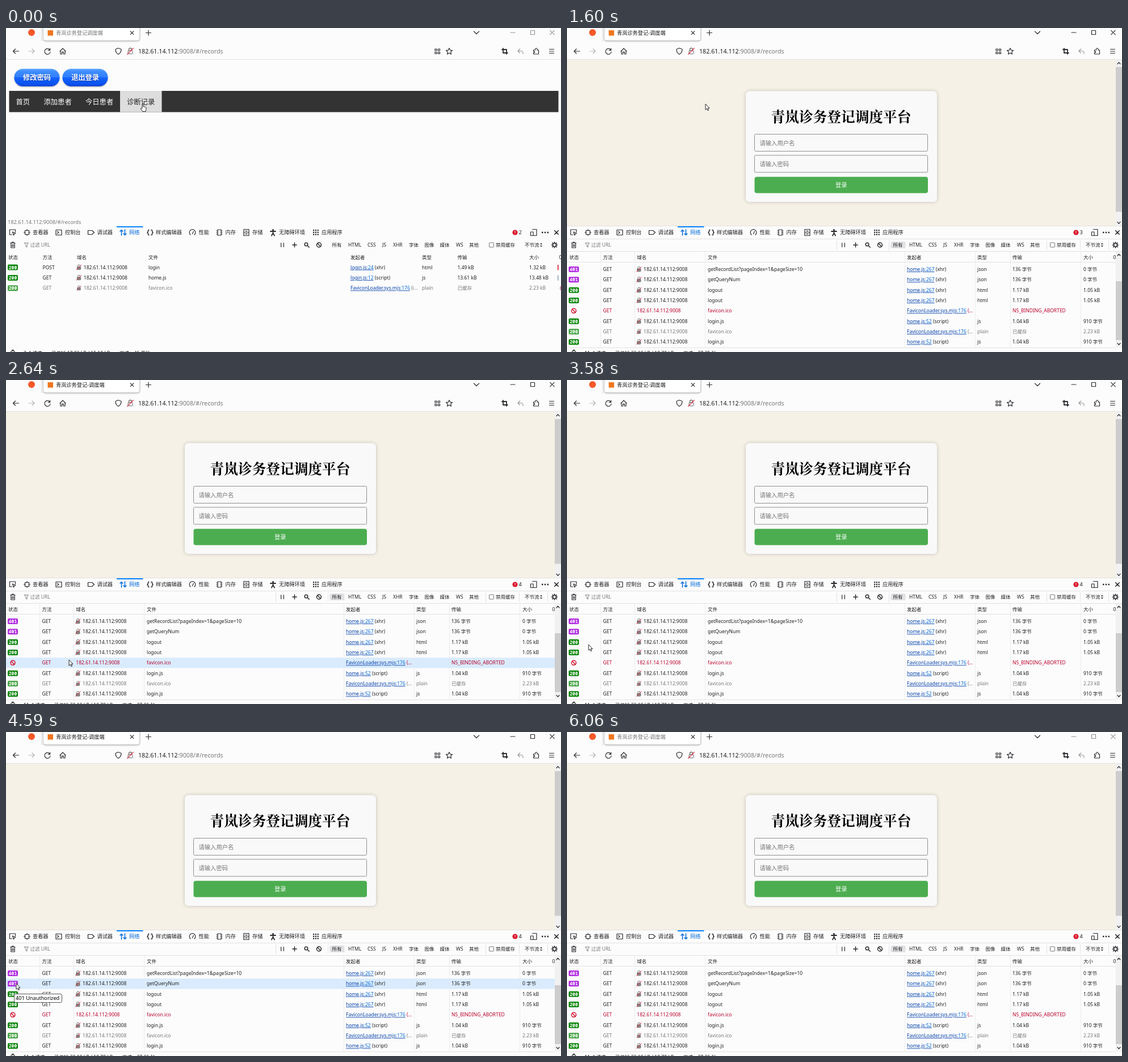
Animation of 978x572 px, one loop 6.08 s. Source, as an HTML page:

```html
<!DOCTYPE html>
<html lang="zh-CN">
<head>
<meta charset="utf-8">
<title>青岚诊务登记调度端</title>
<style>
html,body{margin:0;width:100%;height:100%;overflow:hidden;background:#fcfcfc}
svg{display:block;width:978px;height:572px}
text{font-family:"Noto Sans","Noto Sans CJK SC","Noto Sans CJK",sans-serif;font-size:8.5px;fill:#202023;white-space:pre}
.t{font-size:9.2px}
.m{font-size:12.3px}
.b{font-size:12.3px;font-weight:700;fill:#000}
.g{fill:#777}
.red{fill:#b8002a}
.f{font-size:10.3px;fill:#757575}
.w{fill:#fff}
.h1{font:600 24.7px "Noto Serif CJK SC","Noto Serif",serif;fill:#000}
.code{font:600 8px "Noto Sans Mono",monospace;fill:#fff}
.i{fill:none;stroke:#2b2b30;stroke-width:1.2;stroke-linecap:round;stroke-linejoin:round}
.s{fill:#2b2b30;stroke:none}
.ln{fill:none;stroke:#e2e2e4;stroke-width:1}
</style>
</head>
<body>
<svg id="stage" viewBox="0 0 978 572" xmlns="http://www.w3.org/2000/svg"></svg>
<script>
const HOST = '182.61.14.112';
const LOOP = 6080, ROW0 = 426, STEP = 18.33;

const text = (x, y, s, cls = '', more = '') => `<text x="${x}" y="${y}" class="${cls}" ${more}>${s}</text>`;
const rect = (x, y, w, h, fill, more = '') => `<rect x="${x}" y="${y}" width="${w}" height="${h}" fill="${fill}" ${more}/>`;
const icon = (x, y, d, more = '') => `<path class="i" transform="translate(${x} ${y})" d="${d}" ${more}/>`;
const solid = (x, y, d, more = '') => `<path class="s" transform="translate(${x} ${y})" d="${d}" ${more}/>`;
const line = d => `<path class="ln" d="${d}"/>`;
const group = (id, body, more = '') => `<g id="${id}" ${more}>${body}</g>`;
const disc = r => `M${-r} 0A${r} ${r} 0 1 1 ${r} 0A${r} ${r} 0 1 1 ${-r} 0Z`;
const cross = r => `M${-r} ${-r}L${r} ${r}M${r} ${-r}L${-r} ${r}`;
const plus = r => `M${-r} 0H${r}M0 ${-r}V${r}`;
const block = disc(4) + 'M-2.8 -2.8L2.8 2.8';
const style = s => `style="${s}"`;

function lock(x, y, k = 1, body = '#888') {
  return `<g transform="translate(${x} ${y}) scale(${k})">` +
    icon(0, 0, 'M-2 -1V-2.6A2 2 0 0 1 2 -2.6V-1', style('stroke:#666;stroke-width:1')) +
    rect(-3.2, -1, 6.4, 4.8, body, 'stroke="#666" stroke-width=".8" rx="1"') +
    icon(0, 0, 'M-4.3 4.3L4.3 -4.3', style('stroke:#e0203a;stroke-width:1')) + '</g>';
}

function chrome() {
  const grey = style('stroke:#b5b5b8');
  return rect(0, 0, 978, 55, '#fcfcfc') +
    `<circle cx="45" cy="8" r="6" fill="#f4592b"/>` + line('M62.5 0V24') +
    `<rect x="65.5" y="-6" width="170" height="28" rx="4" fill="#fff" stroke="#cfcfd3" filter="url(#soft)"/>` +
    rect(73.5, 4, 9.5, 9.5, '#f0761e') +
    text(88, 12, '', 't', 'id="name"') +
    icon(222, 8.5, cross(2.8)) + icon(251, 8.5, plus(4.5)) +
    icon(829, 8, 'M-4.5 -2L0 2.5L4.5 -2') +
    group('win', icon(893, 8, 'M-4 0H4') + icon(928, 8, 'M-3.5 -3.5H3.5V3.5H-3.5Z') + icon(962.5, 8, cross(3.7)), style('stroke-width:1')) +
    icon(17.5, 41, 'M5 0H-5M-1 -4L-5 0L-1 4') +
    icon(45, 41, 'M-5 0H5M1 -4L5 0L1 4', grey) +
    icon(73, 41, 'M4 -2.6A5 5 0 1 0 5 1M4.6 -5V-1.6H1.2') +
    icon(100, 41, 'M-5 0L0 -5L5 0M-4 -1V5H-1.4V1.4H1.4V5H4V-1') +
    icon(198, 41, 'M0 -5.5L5 -3.5C5 1 3 4 0 5.5C-3 4 -5 1 -5 -3.5Z') + lock(219, 41, 1.25, 'none') +
    text(233, 45, HOST + '<tspan fill="#77777c">:9008/#/records</tspan>', '', style('font-size:10.7px')) +
    icon(760, 41, 'M-4 -4H-1V-1H-4ZM1.5 -4H4.5V-1H1.5ZM-4 1.5H-1V4.5H-4ZM1.5 1.5H4.5V4.5H1.5Z') +
    icon(781, 41, 'M0 -5.5L1.7 -1.8L5.6 -1.4L2.7 1.3L3.5 5.2L0 3.2L-3.5 5.2L-2.7 1.3L-5.6 -1.4L-1.7 -1.8Z') +
    icon(879, 41, 'M-3 -5V3H5M-5 -3H3V5', style('stroke-width:1.8')) +
    icon(906.5, 41, 'M-1 -4L-4.5 -.5L-1 3M-4.5 -.5H1C4 -.5 5 2 4.5 4.5', style('stroke:#999')) +
    icon(934, 41, 'M-4.5 -2H-1.5V-3.5A1.7 1.7 0 0 1 2 -3.5V-2H4.5V5H-4.5V2.5H-2.5V.5H-4.5Z') +
    icon(961.5, 41, 'M-4 -3.5H4M-4 0H4M-4 3.5H4') +
    line('M0 55.5H978');
}

function records() {
  const pill = (x, s) => rect(x, 72, 80, 31, 'url(#blue)', 'rx="15.5" filter="url(#soft)"') +
    text(x + 40, 92, s, 'b w', 'text-anchor="middle" style="text-shadow:0 1px 1px #0338a0"');
  const heads = { 13: '序号', 114: '操作', 216: '就诊ID', 352.5: '患者姓名', 516.5: '患者ID', 653: '接诊时间', 817: '诊断时间' };
  return rect(0, 56, 978, 293, '#fcfcfc') + pill(14.5, '修改密码') + pill(99.5, '退出登录') +
    rect(5.5, 111, 968, 37.5, '#333') + rect(201, 111, 73.5, 37.5, '#ddd') +
    text(17.5, 135.3, '首页', 'm w') + text(66.5, 135.3, '添加患者', 'm w') +
    text(140, 135.3, '今日患者', 'm w') + text(213, 135.3, '诊断记录', 'm') +
    group('heads', Object.entries(heads).map(([x, s]) => text(x, 169.5, s, 'b')).join('') + line('M5.5 180.5H973.5')) +
    group('box', rect(-2, 335.5, 138, 16, '#fafafa', 'stroke="#d0d0d4" rx="2"')) +
    text(3, 345.6, HOST + ':9008/#/records', 'g', style('font-size:9.25px'));
}

function login() {
  const field = (y, s) => rect(330.5, y, 305, 30, '#f9f9f9', 'stroke="#8f8f94" rx="2"') + text(339.5, y + 19, s, 'f');
  return rect(0, 56, 978, 293.5, '#f5f1e6') +
    rect(315, 111.5, 337, 195.5, '#f9f9fa', 'rx="7" filter="url(#glow)"') +
    text(359.5, 166, '青岚诊务登记调度平台', 'h1') +
    field(187.5, '请输入用户名') + field(224.8, '请输入密码') +
    rect(330.5, 262.7, 305.5, 28.8, '#4cad50', 'rx="4"') + text(483.3, 281.2, '登录', 'f w', 'text-anchor="middle"') +
    rect(967, 56, 11, 293.5, '#f1f1f1') + rect(967, 69, 11, 255.5, '#cdcdcd') +
    icon(972.5, 62, 'M-2.5 1.5L0 -1.3L2.5 1.5') + icon(972.5, 344, 'M-2.5 -1.5L0 1.3L2.5 -1.5');
}

function tools() {
  const y = 361, ty = 364.3;
  const tabs = { 47: '查看器', 104: '控制台', 160.5: '调试器', 264: '样式编辑器', 339.5: '性能', 386.5: '内存', 434: '存储', 481: '无障碍环境', 556: '应用程序' };
  const kinds = { 574.5: '所有', 603: 'HTML', 637: 'CSS', 663: 'JS', 682: 'XHR', 710: '字体', 737.5: '图像', 764.5: '媒体', 793: 'WS', 816: '其他', 863: '禁用缓存', 914: '不节流' };
  let grid = '';
  for (let i = 0; i < 9; i++) grid += `M${i % 3 * 3.8 - 5} ${(i / 3 | 0) * 3.8 - 5}h2.2v2.2h-2.2Z`;
  const labels = (o, base, cls) => Object.entries(o).map(([x, s]) => text(x, base, s, cls)).join('');
  return rect(195, 350, 46.5, 2, '#0a84ff') +
    labels(tabs, ty, 't') + text(217, ty, '网络', 't', style('fill:#0069d9')) +
    icon(11.5, y, 'M-1 4H-5V-5H5V-1M0 -1L5.5 1.3L3 2.5L2 5Z') +
    icon(37, y, 'M-3.5 -3.5H3.5V3.5H-3.5ZM0 -5.5V-3M0 3V5.5M-5.5 0H-3M3 0H5.5') +
    icon(93, y, 'M-5 -4.5H5V4.5H-5ZM-2.5 -2L0 0L-2.5 2') +
    icon(150, y, 'M-5.5 -3.5H1.5L5.5 0L1.5 3.5H-5.5Z') +
    icon(206.5, y, 'M-3 5V-4.5M-5.5 -2L-3 -4.5L-.5 -2M3 -5V4.5M.5 2L3 4.5L5.5 2', style('stroke:#0069d9;stroke-width:1.5')) +
    icon(254, y, 'M-2 -4.5Q-3.6 -4.5 -3.6 -3V-1.5L-5 0L-3.6 1.5V3Q-3.6 4.5 -2 4.5M2 -4.5Q3.6 -4.5 3.6 -3V-1.5L5 0L3.6 1.5V3Q3.6 4.5 2 4.5', style('stroke-width:1.5')) +
    icon(328.5, y, 'M-3.5 4A5.3 5.3 0 1 1 3.5 4M0 2.5L2 -2') +
    icon(376, y, 'M-3 -5H3V5H-3ZM-5 -3H-3M-5 0H-3M-5 3H-3M3 -3H5M3 0H5M3 3H5') +
    icon(423.5, y, 'M-4.5 -5.5H4.5V5.5H-4.5ZM-4.5 0H4.5M-1.5 -2.7H1.5M-1.5 2.7H1.5') +
    icon(470.5, y, 'M-4.5 -2H4.5M0 -2V1.5M-2.5 5.5L0 1L2.5 5.5', style('stroke-width:1.8')) + solid(470.5, 356.5, disc(1.6)) +
    solid(546, y, grid) +
    solid(897, y, disc(4.5), style('fill:#d70022')) + icon(897, y, 'M0 -2.5V.3M0 2.4V2.5', style('stroke:#fff')) +
    text(903.5, ty, '', 't', 'id="count"') +
    icon(930, y, 'M-2.5 -5.5H5V5.5H-1M-5.5 -1H-1V5.5H-5.5Z') +
    solid(950, y, 'M-6 -1.2h2.5v2.4h-2.5ZM-1.2 -1.2h2.5v2.4h-2.5ZM3.6 -1.2h2.5v2.4h-2.5Z') +
    icon(970, y, cross(3.3), style('stroke-width:1.6')) +
    icon(12, 383, 'M-4 -3.5H4M-1.5 -3.5V-5H1.5V-3.5M-3.2 -3V5H3.2V-3M-1 -1V3M1 -1V3') +
    icon(36, 383, 'M-3.5 -3.5H3.5L1 0V4L-1 3V0Z', style('stroke:#777;stroke-width:.9')) + text(42.5, 386.3, '过滤 URL', 'g') +
    icon(487, 383, 'M-2.3 -3.5V3.5M2.3 -3.5V3.5') + icon(508.5, 383, plus(3.7), style('stroke-width:1.5')) +
    icon(529, 382, disc(2.8) + 'M2.2 2.2L5.3 5.3', style('stroke-width:1.5')) + icon(551.5, 383, block, style('stroke-width:1.5')) +
    labels(kinds, 386.3, '') + rect(851.5, 379, 8, 8, '#fff', 'stroke="#77777c" rx="1"') +
    solid(943, 383, 'M-2 -1L0 -3.5L2 -1ZM-2 1L0 3.5L2 1Z') +
    icon(966.5, 383, disc(3) + 'M0 -5V-3M0 3V5M-5 0H-3M3 0H5M-3.6 -3.6L-2.2 -2.2M2.2 2.2L3.6 3.6M3.6 -3.6L2.2 -2.2M-2.2 2.2L-3.6 3.6', style('stroke-width:1.6'));
}

// Row: code, method, file, link, line, note, type, sent, size, look
function netRow(y, cols, [code, verb, file, src, num, note, type, sent, size, look = '']) {
  const base = y + 3.1, bad = look === 'red';
  const cell = (n, s) => text(cols[n], base, s, look);
  const badge = code ? rect(3, y - 5, 18, 10, code === 401 ? '#b02be0' : '#078507', `rx="2" ${look === 'g' ? 'opacity=".75"' : ''}`) +
    text(12, y + 3, code, 'code', 'text-anchor="middle"') : icon(12, y, block, style('stroke:#d0102c;stroke-width:1.5'));
  const link = `<tspan text-decoration="underline" fill="#003eaa">${src}<tspan fill="#0069d9">:${num}</tspan></tspan> ${note}`;
  return badge + cell(1, verb) +
    (bad ? '' : lock(cols[2] + 3.5, y, look ? .9 : 1)) +
    text(cols[2] + (bad ? 0 : 11.8), base, HOST + ':9008', look) +
    cell(3, file) + cell(4, link) + cell(5, type) + cell(6, sent) + cell(7, size);
}

function list(cols, rows, y0, foot) {
  const names = ['状态', '方法', '域名', '文件', '发起者', '类型', '传输', '大小'];
  return names.map((s, n) => text(cols[n], 408, s)).join('') +
    rows.map((r, n) => netRow(y0 + n * STEP, cols, r)).join('') +
    icon(12, 573.5, disc(3.8) + 'M-1.5 -5H1.5') + foot;
}

const icoLink = ['FaviconLoader.sys.mjs', 176];
const firstRows = [
  [200, 'POST', 'login', 'login.js', 24, '(xhr)', 'html', '1.49 kB', '1.32 kB'],
  [200, 'GET', 'home.js', 'login.js', 12, '(script)', 'js', '13.61 kB', '13.48 kB'],
  [200, 'GET', 'favicon.ico', ...icoLink, '(i…', 'plain', '已缓存', '2.23 kB', 'g']
];
const denied = f => [401, 'GET', f, 'home.js', 267, '(xhr)', 'json', '136 字节', '0 字节'];
const logout = [200, 'GET', 'logout', 'home.js', 267, '(xhr)', 'html', '1.17 kB', '1.05 kB'];
const script = [200, 'GET', 'login.js', 'home.js', 52, '(script)', 'js', '1.04 kB', '910 字节'];
const lateRows = [
  denied('getRecordList?pageIndex=1&amp;pageSize=10'), denied('getQueryNum'), logout, logout,
  [0, 'GET', 'favicon.ico', ...icoLink, '(…', '', 'NS_BINDING_ABORTED', '', 'red'],
  script, [200, 'GET', 'favicon.ico', ...icoLink, '(…', 'plain', '已缓存', '2.23 kB', 'g'], script
];

const firstList = list([4, 64.5, 125, 251, 607, 733, 795.5, 922], firstRows, 422.6,
    text(31, 577, '3 个请求') + text(80, 577, '已传输 17.03 kB / 15.18 kB') + text(200, 577, '完成：46 毫秒')) +
  text(974.5, 408, '0') + rect(972, 418, 1.5, 9.5, '#d8102c') + rect(972, 436.5, 1.5, 9.5, '#8ba0bd') + text(976, 462.5, '0', 'red');

const lateList = line('M0 349.5H978M0 372.5H978M0 394.5H978M0 413.5H967M0 564.5H967M475.5 375V392M567.5 375V392M845.5 375V392M904.5 375V392M954.5 375V392') +
  `<path class="ln" style="stroke:#ececee" d="M59.5 395V564M119.5 395V564M243.5 395V564M595.5 395V564M719.5 395V564M781.5 395V564M905.5 395V564"/>` +
  rect(570.5, 377, 26, 12, '#e1e1e4', 'rx="2"') + rect(0, 0, 967, 18.3, '#d9ebfd', 'id="hover"') +
  list([4, 63.5, 123.3, 248, 599, 723, 785, 910], lateRows, ROW0,
    text(31, 577, '11 个请求') + text(85, 577, '已传输 23.18 kB / 18.79 kB') + text(205, 577, '', '', 'id="time"')) +
  text(962.5, 408, '0') + rect(967, 395, 11, 169, '#f1f1f1') + rect(967, 447, 11, 104, '#cdcdcd') +
  icon(972.5, 400.5, 'M-2.5 1.5L0 -1.3L2.5 1.5') + icon(972.5, 558, 'M-2.5 -1.5L0 1.3L2.5 -1.5');

const pointer = 'stroke="#111" stroke-width=".9" stroke-linejoin="round" fill="#fff"';
document.getElementById('stage').innerHTML = `<defs>
  <linearGradient id="blue" x2="0" y2="1"><stop stop-color="#64a8ff"/><stop offset=".15" stop-color="#3d8dff"/><stop offset=".5" stop-color="#2f7dff"/><stop offset=".5" stop-color="#1464fb"/><stop offset=".8" stop-color="#0c55f5"/><stop offset="1" stop-color="#1348d8"/></linearGradient>
  <filter id="soft" x="-10%" y="-20%" width="120%" height="150%"><feDropShadow dx="0" dy="1" stdDeviation="1.3" flood-opacity=".35"/></filter>
  <filter id="glow"><feDropShadow dx="0" dy="0" stdDeviation="3" flood-opacity=".22"/></filter></defs>` +
  rect(0, 0, 978, 572, '#fcfcfc') + group('page1', records()) + group('page2', login()) + chrome() +
  rect(0, 349.5, 978, 223, '#fcfcfc') + group('list1', firstList) + group('list2', lateList) + tools() +
  group('tip', rect(14.5, 462.5, 84, 15, '#fff', 'stroke="#55555a" rx="2.5"') + text(17, 473.4, '401 Unauthorized', '', style('font-size:9.2px;fill:#000'))) +
  group('arrow', `<path ${pointer} d="M0 0V10.3L2.4 8.2L4 11.8L5.6 11.1L4.1 7.5H7Z"/>`) +
  group('hand', `<path ${pointer} d="M3 8V1.2Q4 -.2 5 1.2V5Q6 4.3 6.8 5.3Q7.8 4.8 8.5 5.8Q9.6 5.4 10 6.6V9.5L8.8 13.5H4L.4 8.8Q.6 7.2 2 7.7Z"/>`);

// Pointer: time, x, y, hovered row
const path = [
  [0, 237, 134], [150, 236.5, 134], [430, 244, 134], [2210, 222, 240], [2340, 191, 370],
  [2490, 140, 457, 1], [2640, 111, 494, 4], [2760, 107, 497, 4], [2880, 104, 499, 4], [3030, 103, 500, 4],
  [3180, 102, 500, 4], [3330, 86, 503, 4], [3460, 60, 487], [3580, 38, 467], [3730, 27, 451, 2],
  [3880, 18, 444, 1], [5330, 20, 503, 3], [5480, 28, 562], [5630, 28, 600]
];
const el = id => document.getElementById(id);
const show = (id, v) => el(id).setAttribute('opacity', +v);
const move = (id, x, y) => el(id).setAttribute('transform', `translate(${x} ${y})`);
const ramp = (t, a, b) => t < a ? 0 : t < b ? .5 : 1;

function draw(t) {
  const [, x, y, row = -1] = path.findLast(p => p[0] <= t);
  const out = t >= 1600, active = t >= 1460 && t < 6060;
  show('page1', !out); show('list1', !out);
  show('page2', out); show('list2', out);
  show('heads', t >= 1460);
  show('box', ramp(t, 150, 280));
  show('win', active ? 1 : .5);
  show('hover', row >= 0);
  move('hover', 0, ROW0 + row * STEP - 9.1);
  show('tip', t < 5330 ? ramp(t, 4460, 4590) : 0);
  show('hand', t < 430); show('arrow', t >= 430);
  move('hand', x, y); move('arrow', x, y);
  el('name').textContent = out ? '青岚诊务登记-调度端' : '青岚诊务登记调度端';
  el('name').style.fill = active ? '#151518' : '#737378';
  el('count').textContent = t < 1600 ? 2 : t < 2060 ? 3 : 4;
  el('time').textContent = `完成：${t < 1750 ? 37.25 : 37.26} 秒`;
}

const start = performance.now();
function tick() {
  draw((performance.now() - start) % LOOP);
  requestAnimationFrame(tick);
}
tick();
</script>
</body>
</html>
```
